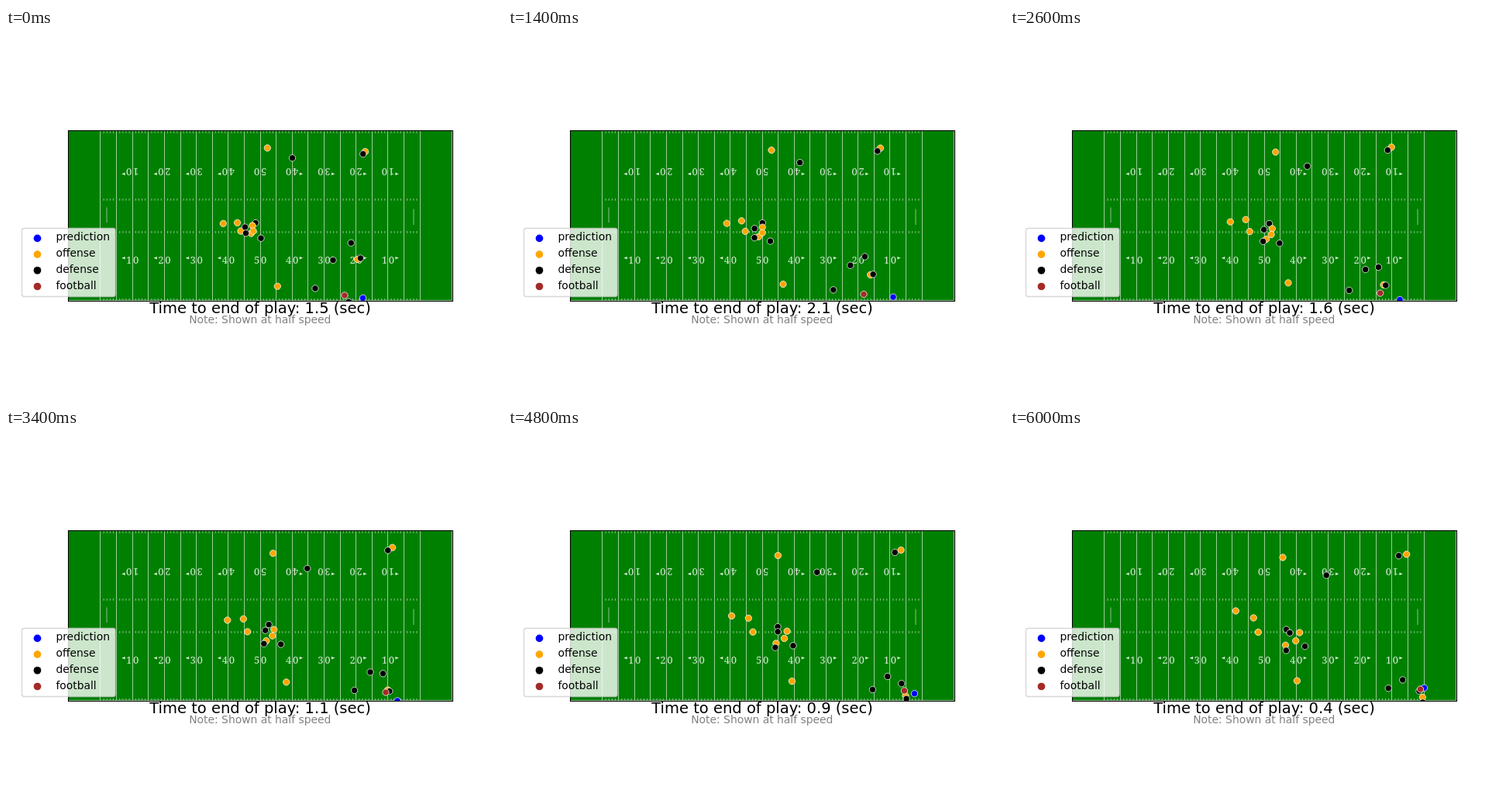
These frames come from a looping animation (640 px wide and 480 px high, 6200 ms). An HTML page:

```html
<!DOCTYPE html>
<html lang="en">
<head>
<meta charset="utf-8">
<title>Play animation</title>
<style>
  html, body { margin: 0; width: 100%; height: 100%; overflow: hidden; background: #fff; }
  svg { display: block; }
  text { font: 13.89px "DejaVu Sans", sans-serif; }
  #clock { font-size: 19.5px; }
  #yards { fill: #fff; fill-opacity: .85; }
  #yards text { font: 13px "Noto Serif", serif; text-anchor: middle; }
  .dot { stroke: #fff; stroke-width: .75; }
</style>
</head>
<body>
<svg width="640" height="480" viewBox="0 0 640 480">
  <clipPath id="field"><rect x="80" y="132" width="496" height="220.6"/></clipPath>
  <rect x="80" y="132" width="496" height="220.5" fill="green"/>
  <path id="lines" fill="none" stroke="#fff" stroke-opacity=".6"/>
  <path id="ticks" fill="none" stroke="#fff" stroke-opacity=".6" stroke-width=".9"/>
  <g id="yards"></g>
  <g id="players" clip-path="url(#field)"></g>
  <rect x="80.5" y="132.5" width="496" height="220" fill="none" stroke="#000" stroke-width="1.1"/>
  <text id="clock" x="185.3" y="368"></text>
  <text x="327.8" y="381" text-anchor="middle" fill="gray">Note: Shown at half speed</text>
  <g id="legend">
    <rect x="20.5" y="258.5" width="120.5" height="88" rx="2.8" fill="#fff" fill-opacity=".8" stroke="#ccc" stroke-opacity=".8" stroke-width="1.3"/>
  </g>
</svg>
<script>
const $ = id => document.getElementById(id);
const add = (parent, tag, attrs, text = '') => {
  const el = document.createElementNS('http://www.w3.org/2000/svg', tag);
  for (const k in attrs) el.setAttribute(k, attrs[k]);
  el.textContent = text;
  return parent.appendChild(el);
};

// Field markings, in yards from the left goal line
const yardX = yard => 121.99 + yard * 4.1206;
let lines = 'M80 351.5H575.5V133', ticks = 'M130 231.5V251M526 233.5V254';
for (let y = 0; y <= 100; y++) {
  const x = Math.floor(yardX(y)) + .5;
  if (y % 5 === 0) lines += `M${x} 133V352`;
  else for (const top of [133, 220, 262, 349]) ticks += `M${yardX(y)} ${top}v2.8`;
}
$('lines').setAttribute('d', lines);
$('ticks').setAttribute('d', ticks);

for (let y = 10; y <= 90; y += 10) {
  const label = String(Math.min(y, 100 - y)), side = Math.sign(y - 50);
  for (const [cy, turn] of [[299, 0], [186, 180]]) {
    const g = add($('yards'), 'g', { transform: `translate(${yardX(y)} ${cy}) rotate(${turn})` });
    [...label].forEach((digit, i) => add(g, 'text', { x: i * 9 - 4.5, y: 4.7 }, digit));
    const dir = turn ? -side : side;
    if (dir) add(g, 'path', { d: `M${dir * 9.5} -4l${dir * 4.5} 1.7l${-dir * 4.5} 1.7z` });
  }
}

[['prediction', 'blue'], ['offense', 'orange'], ['defense', 'black'], ['football', 'brown']].forEach(([name, fill], i) => {
  add($('legend'), 'circle', { cx: 40.5, cy: 271.4 + i * 20.7, r: 4.86, fill });
  add($('legend'), 'text', { x: 64.4, y: 274 + i * 21 }, name);
});

// Each run: start, end, sideways bow; without its own value, x speeds up slightly
const runs = {
  orange: [
    [337.3, 154.8, 352, 167],
    [463.5, 159.5, 511.7, 163, -7.4, 8],
    [280.3, 252.3, 291.3, 236, 5],
    [298.5, 251.3, 314.2, 245, -1.4],
    [303, 262, 320.3, 263.5],
    [316.3, 265, 355.5, 280.3, 1],
    [318, 255, 373.7, 264],
    [319, 262, 368.7, 274.6, -1],
    [350.3, 333.3, 370.4, 326.2, -1.4, 0],
    [453.2, 298.5, 532.3, 347.5, 12]
  ],
  black: [
    [308.5, 257, 361, 264.3],
    [309.5, 264.7, 356.3, 287, 1],
    [329, 271.2, 380.6, 281.7, 2],
    [369.5, 167.7, 408.2, 190, 1],
    [460.7, 162.5, 501.7, 164.8, -6, 9],
    [445.3, 277.3, 528, 339.3, 4.5],
    [422, 299.6, 506.7, 325, 1, 0],
    [457.4, 297, 532.5, 354, 10.5],
    [399, 336, 488.3, 335.8, 2.7, 0],
    [442.3, 353.3, 475, 405]
  ],
  brown: [[437, 345, 529.5, 337, .6, .6]]
};
const rusher = [322, 251.5, 356.5, 260, -2.8];

// Forecast at a few steps: step, x, y, seconds left
const forecast = [[0, 460.5, 348.5, 1.5], [7, 497, 347.2, 2.1], [13, 503, 350.5, 1.6],
  [17, 505, 352, 1.1], [21, 519.5, 346.4, 1.1], [30, 534.5, 335.3, .4]];

const forecastAt = n => {
  const i = Math.max(1, forecast.findIndex(row => row[0] >= n));
  const a = forecast[i - 1], b = forecast[i], f = (n - a[0]) / (b[0] - a[0]);
  return a.map((v, k) => v + (b[k] - v) * f);
};
const runAt = ([x0, y0, x1, y1, bowY = 0, bowX = (x0 - x1) * .07], u) => {
  const arc = 4 * u * (1 - u);
  return [x0 + (x1 - x0) * u + bowX * arc, y0 + (y1 - y0) * u + bowY * arc];
};

const dot = fill => add($('players'), 'circle', { class: 'dot', r: 4.17, fill });
const place = (el, x, y) => { el.setAttribute('cx', x); el.setAttribute('cy', y); };
const guessDot = dot('blue');
const movers = [{ run: rusher, el: dot('black') }];
for (const fill in runs) for (const run of runs[fill]) movers.push({ run, el: dot(fill) });

function draw(n) {
  for (const { run, el } of movers) place(el, ...runAt(run, n / 30));
  const [, x, y, seconds] = forecastAt(n);
  place(guessDot, x, y);
  $('clock').textContent = `Time to end of play: ${seconds.toFixed(1)} (sec)`;
}

const start = performance.now();
function tick() {
  draw(Math.floor((performance.now() - start) % 6200 / 200));
  requestAnimationFrame(tick);
}
tick();
</script>
</body>
</html>
```
